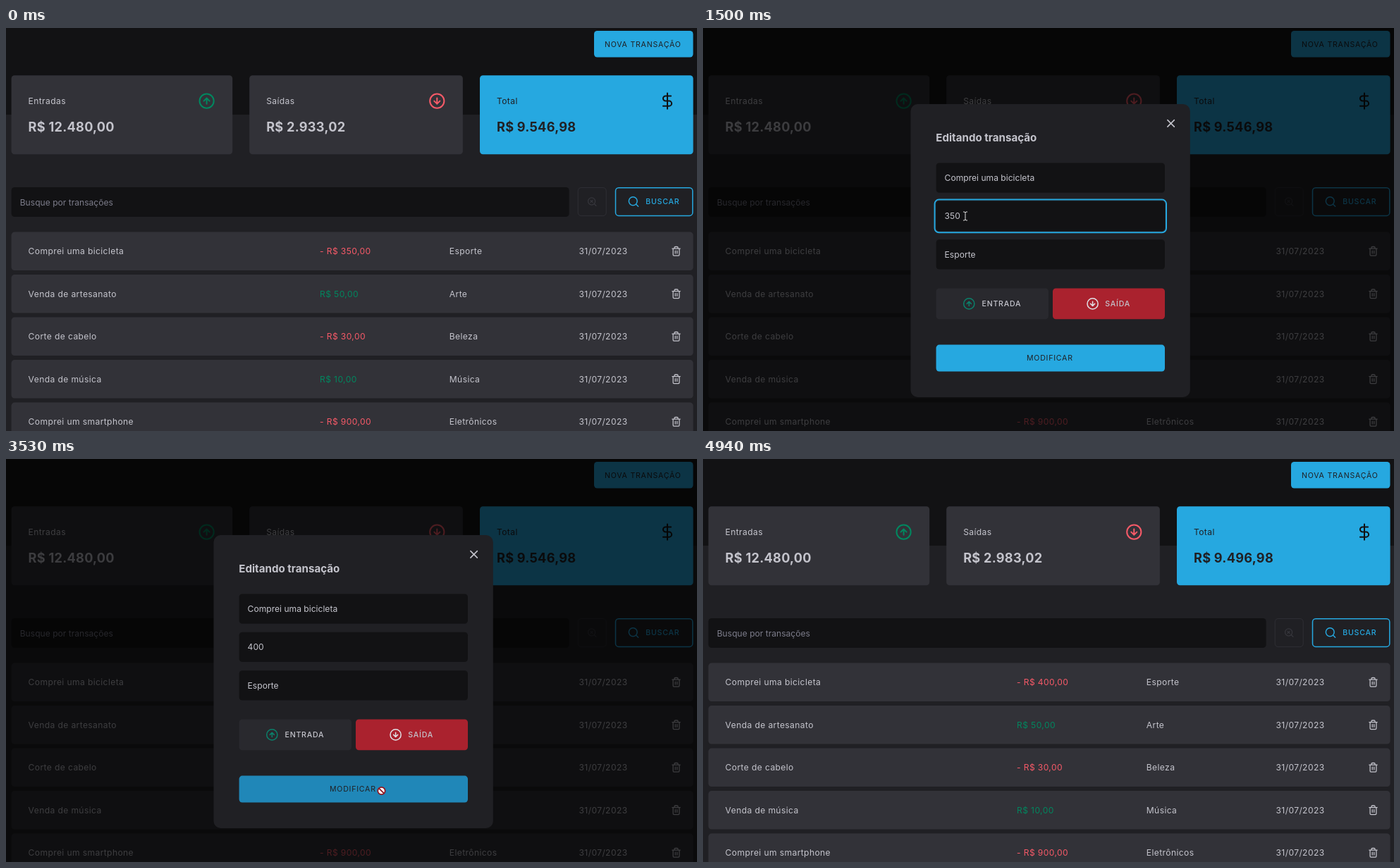
An HTML page for the animation above (5300 ms loop, 980x572 px).

```html
<!DOCTYPE html>
<html lang="pt-BR">
<head>
<meta charset="utf-8">
<title>Transações</title>
<style>
html, body { margin: 0; width: 100%; height: 100%; overflow: hidden; background: #202024; }
svg { display: block; }
text { font: 12.1px Inter, sans-serif; fill: #c4c4cc; white-space: pre; }
.wide { letter-spacing: .38px; }
.total { font-size: 18.17px; font-weight: 700; letter-spacing: .25px; }
.title { font-size: 15.14px; font-weight: 700; }
.caps { font-size: 10.6px; letter-spacing: .76px; }
.medium { font-weight: 500; }
.dark { fill: #202024; }
.in { fill: #00875f; }
.out { fill: #f75a68; }
.blue { fill: #26a8e0; }
.hint { fill: #7c7c8a; }
.icon { fill: none; stroke-width: 2; stroke-linecap: round; stroke-linejoin: round; }
</style>
</head>
<body>
<svg id="stage" width="980" height="572"></svg>
<script>
const LOOP = 5300;
const BLUE = '#26a8e0', INK = '#121214', CARD = '#323238', TEXT = '#c4c4cc';

const box = (x, y, w, h, fill, extra = '') =>
  `<rect x="${x}" y="${y}" width="${w}" height="${h}" rx="4.5" fill="${fill}" ${extra}/>`;
const label = (x, y, text, cls = '', id = '') =>
  `<text x="${x}" y="${y}" class="${cls}" ${id && `id="${id}"`}>${text}</text>`;

// Icons live on a 24-unit grid and are placed by their centre
const shapes = {
  up: 'M2 12a10 10 0 1 0 20 0a10 10 0 1 0-20 0M16 12L12 8L8 12M12 16V8',
  down: 'M2 12a10 10 0 1 0 20 0a10 10 0 1 0-20 0M8 12L12 16L16 12M12 8V16',
  dollar: 'M12 1V23M17 5H9.5a3.5 3.5 0 0 0 0 7h5a3.5 3.5 0 0 1 0 7H6',
  search: 'M3 11a8 8 0 1 0 16 0a8 8 0 1 0-16 0M21 21L16.65 16.65',
  clear: 'M3 11a8 8 0 1 0 16 0a8 8 0 1 0-16 0M21 21L16.65 16.65M8.5 8.5l5 5m0-5l-5 5',
  trash: 'M3 6H21M19 6v14a2 2 0 0 1-2 2H7a2 2 0 0 1-2-2V6m3 0V4a2 2 0 0 1 2-2h4a2 2 0 0 1 2 2v2M10 11v6M14 11v6',
  close: 'M18 6L6 18M6 6L18 18'
};
const icon = (name, x, y, scale, color, extra = '') =>
  `<path class="icon" d="${shapes[name]}" stroke="${color}" ${extra}
    transform="translate(${x} ${y}) scale(${scale}) translate(-12 -12)"/>`;

const summary = (x, w, name, id, shape, color, fill = CARD, cls = '') =>
  box(x, 67.3, w, 112, fill) + label(x + 24, 108, name, 'wide ' + cls) +
  label(x + 24, 147.2, '', 'total ' + cls, id) + icon(shape, x + w - 36.6, 103.6, 1.01, color);

const row = ([name, value, category], i) => {
  const y = 289.6 + i * 60.5, base = y + 31.6;
  return box(7.6, y, 967, 54.5, CARD) + label(31.6, base, name, 'wide') +
    label(445, base, value, 'wide ' + (value[0] === 'R' ? 'in' : 'out'), 'value' + i) +
    label(628.8, base, category, 'wide') + label(812.5, base, '31/07/2023', 'wide') +
    icon('trash', 950.5, y + 27.2, .63, TEXT);
};

const page = `
  <rect width="980" height="572" fill="#202024"/>
  <rect width="980" height="123" fill="${INK}"/>
  ${box(834, 4, 140.5, 37.6, BLUE)}${label(849, 26.5, 'NOVA TRANSAÇÃO', 'caps dark')}
  ${summary(7.6, 313.6, 'Entradas', 'income', 'up', '#00875f')}
  ${summary(345.2, 302.7, 'Saídas', 'outcome', 'down', '#f75a68')}
  ${summary(672, 302.6, 'Total', 'total', 'dollar', INK, BLUE, 'dark')}
  ${box(7.6, 226, 791, 42, INK)}${label(19.7, 251.5, 'Busque por transações', 'hint')}
  ${box(811.2, 226.6, 40, 40, 'none', 'stroke="#2f2f35"')}${icon('clear', 831.2, 246.6, .63, '#36363c')}
  ${box(864.5, 226.8, 109.3, 39.6, 'none', `stroke="${BLUE}" stroke-width="1.5"`)}
  ${icon('search', 890, 246.5, .74, BLUE)}${label(907.3, 250.3, 'BUSCAR', 'caps medium blue')}
  ${[['Comprei uma bicicleta', '- R$ 350,00', 'Esporte'],
     ['Venda de artesanato', 'R$ 50,00', 'Arte'],
     ['Corte de cabelo', '- R$ 30,00', 'Beleza'],
     ['Venda de música', 'R$ 10,00', 'Música'],
     ['Comprei um smartphone', '- R$ 900,00', 'Eletrônicos']].map(row).join('')}`;

const modal = `<g id="modal">
  <rect width="980" height="572" opacity=".69"/>
  <rect x="294.5" y="108" width="396.3" height="416" rx="10" fill="#202024"/>
  ${icon('close', 663.6, 135.4, .79, TEXT)}
  ${label(330.3, 161, 'Editando transação', 'title')}
  ${[191.4, 245.8, 300.2].map(y => box(330.6, y, 324.4, 42.3, INK)).join('')}
  <rect id="focus" x="328.6" y="243.6" width="328.4" height="46.6" rx="6" fill="none" stroke="${BLUE}" stroke-width="2"/>
  <rect id="selection" y="259" height="15.5" fill="#2f65b0"/>
  ${label(342.6, 216.9, 'Comprei uma bicicleta')}${label(342.6, 271.3, '', '', 'amount')}
  ${label(342.6, 325.7, 'Esporte')}
  <rect id="caret" y="259.5" width="1" height="14.5" fill="${TEXT}"/>
  <g id="suggestion"><rect x="407.5" y="300" width="113" height="27" fill="#3b3b3e"/>
    ${label(415.5, 315.3, '350,25" style="')}</g>
  ${box(330.6, 369.5, 159.4, 43.8, '#29292e')}${box(496, 369.5, 159, 43.8, '#aa222e')}
  ${icon('up', 377.3, 391.4, .757, '#0b806b', 'id="entryIcon"')}${label(395.5, 395.3, 'ENTRADA', 'caps medium')}
  ${icon('down', 552.6, 391.4, .757, '#e1e1e6')}
  ${label(570.3, 395.3, 'SAÍDA', 'caps medium')}
  ${box(330.6, 449.6, 324.4, 38, BLUE, 'id="submit"')}${label(459, 472.3, 'MODIFICAR', 'caps dark')}
</g>`.replace('350,25" style="', '<tspan font-size="9.5">350,25</tspan>');

const outline = 'fill="#fff" stroke="#000" stroke-width=".9" stroke-linejoin="round"';
const pointers = `
  <circle id="click" cx="502.6" cy="321.3" r="9.6" fill="#b5a51c" opacity=".9"/>
  <g id="pointer">
    <path id="hand" ${outline} d="M-1.6 1.2Q0-.7 1.6 1.2V6Q3.2 5.2 4 6.7Q5.6 6 6.2 7.5Q8.3 7.3 8.3 9.5V12.5L6.8 16V17.8H-1.2V16L-4.8 11.2Q-5.3 9.2-3.4 9.3L-1.6 11Z"/>
    <path id="beam" fill="none" stroke="#ddd" d="M-3-6H-1L0-5L1-6H3M0-5V5M-3 6H-1L0 5L1 6H3"/>
    <path id="arrow" ${outline} d="M0 0V13L3 10.2L5 15L7 14.1L5 9.5H9Z"/>
    <g id="ban"><circle r="5.2" fill="#fff" stroke="#8f1620" stroke-width="1.8"/>
      <path d="M-3.6-3.6L3.6 3.6" stroke="#8f1620" stroke-width="1.8"/></g>
  </g>`;

stage.innerHTML = page + modal + pointers;

const el = id => document.getElementById(id);
const show = (id, visible) => el(id).setAttribute('opacity', +visible);
const write = (id, text) => { if (el(id).textContent !== text) el(id).textContent = text; };

const moves = [
  [0, '', 0, 0],
  [190, 'hand', 537, 521], [300, 'hand', 488, 488], [400, 'hand', 485, 396],
  [500, 'hand', 497, 342], [600, 'hand', 503.5, 322.5],
  [900, 'beam', 504.5, 323.5], [1200, 'beam', 470, 290], [1300, 'beam', 402, 268],
  [1400, 'beam', 372, 267], [1510, 'beam', 352, 266], [1610, 'beam', 329, 266],
  [1710, 'beam', 335.5, 266.5], [2720, 'beam', 350, 276], [2820, 'arrow', 412, 346],
  [2920, 'hand', 476, 400], [3020, 'arrow', 520, 440], [3130, 'hand', 530, 462],
  [3230, 'hand', 532.5, 471], [3530, 'ban', 532.5, 471], [3630, 'hand', 534.2, 472],
  [4030, 'hand', 545, 440], [4130, 'hand', 562, 365], [4230, 'hand', 556, 330],
  [4340, 'hand', 520, 328], [4440, 'hand', 496, 327], [4540, 'hand', 502, 325],
  [4740, 'hand', 503, 428], [4840, 'hand', 650, 554], [4940, '', 0, 0]
];

function draw(t) {
  const within = (from, to) => t >= from && t < to;
  const saved = t >= 3630;
  write('income', 'R$ 12.480,00');
  write('outcome', saved ? 'R$ 2.983,02' : 'R$ 2.933,02');
  write('total', saved ? 'R$ 9.496,98' : 'R$ 9.546,98');
  write('value0', saved ? '- R$ 400,00' : '- R$ 350,00');

  const amount = t < 2220 ? '350' : '400'.slice(0, Math.floor((t - 2220) / 100) + 1);
  write('amount', amount);
  const end = 342.6 + el('amount').getComputedTextLength();
  const [, kind, x, y] = moves.findLast(move => move[0] <= t);

  show('modal', within(900, 3630));
  show('entryIcon', t < 1000 ? .35 : 1);
  show('focus', within(1400, 3530));
  show('suggestion', within(1510, 2220) ? 1 : within(2220, 2320) ? .13 : 0);
  show('caret', within(2220, 2920));
  el('caret').setAttribute('x', end + .5);

  const from = Math.min(end, Math.max(342.6, x));
  el('selection').setAttribute('x', from);
  el('selection').setAttribute('width', within(1400, 2220) ? end - from : 0);
  el('submit').setAttribute('fill', t < 3130 ? BLUE : t < 3330 ? '#2398cc' : '#2087b8');

  show('click', within(800, 900));
  for (const id of ['hand', 'beam', 'arrow', 'ban']) show(id, id === kind);
  el('pointer').setAttribute('transform', `translate(${x} ${y})`);
}

function tick() {
  draw(performance.now() % LOOP);
  requestAnimationFrame(tick);
}
tick();
</script>
</body>
</html>
```
